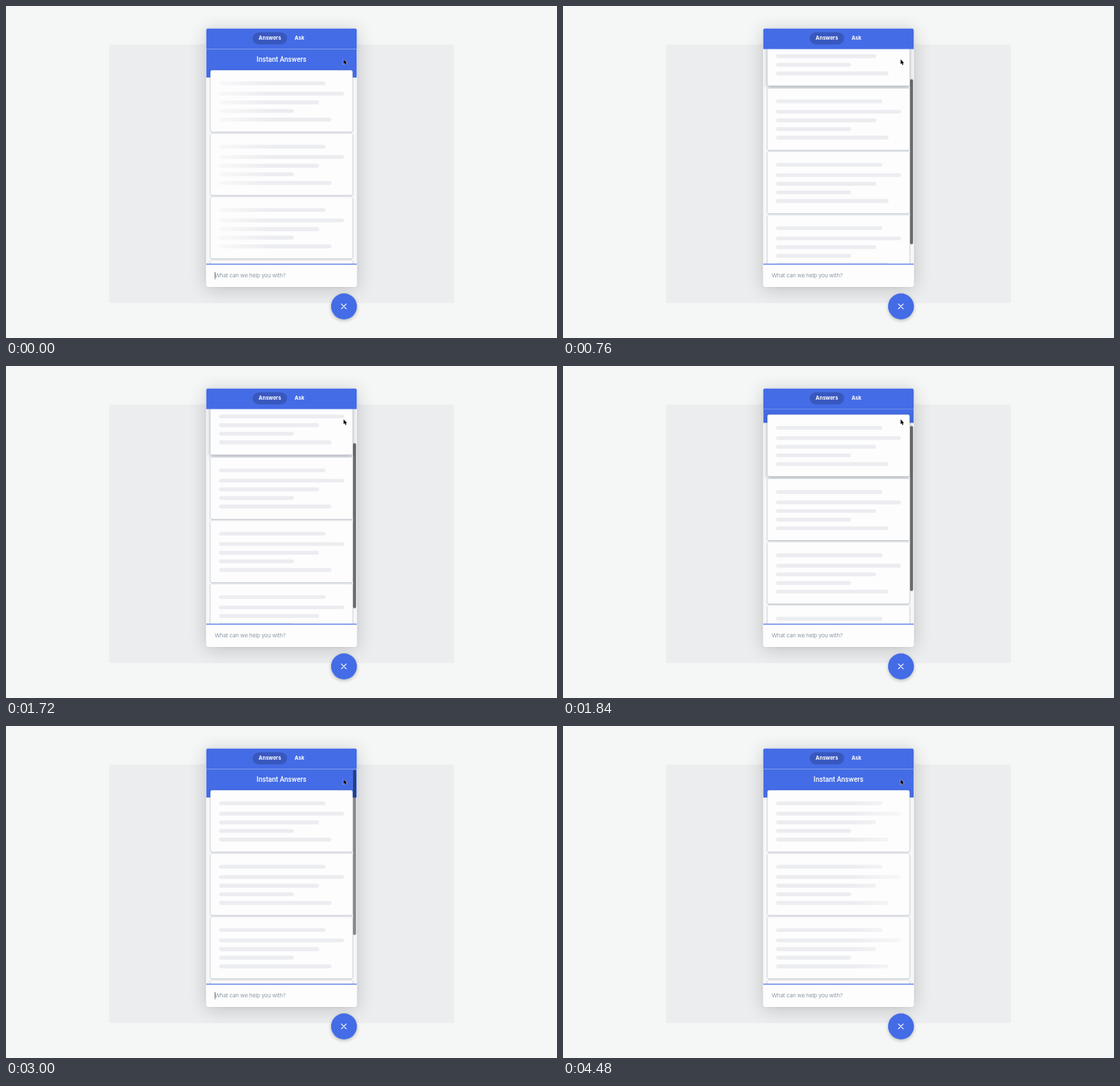
Animation of 800x482 px, one loop 4560 ms. Source, as an HTML page:

```html
<!DOCTYPE html>
<html lang="en">
<head>
<meta charset="utf-8">
<title>Instant Answers</title>
<style>
  html, body { margin: 0; width: 100%; height: 100%; overflow: hidden; }
  body { position: relative; background: #f5f7f7; font-family: Inter, sans-serif; }
  div, svg { position: absolute; box-sizing: border-box; }
  /* The widget is laid out at 350 x 600 and shown smaller. */
  .stage { left: 0; top: 0; transform-origin: 0 0; transform: translate(290.5px, 32.5px) scale(.6258); }
  .page { left: -225px; top: 37px; width: 800px; height: 600px; border-radius: 4px; background: #ebedee; }
  .panel, .shade { width: 350px; height: 600px; border-radius: 6px; }
  .panel { background: #f5f7f9; overflow: hidden; }
  .shade { box-shadow: 0 5px 40px rgba(0, 0, 0, .19), 0 0 3px rgba(0, 0, 0, .15); }
  .blue { background: #446ce6; }
  .view { top: 48px; width: 350px; height: 498px; overflow: hidden; }
  .hero { width: 350px; height: 66px; }
  .heading { top: 8px; width: 350px; text-align: center; color: #fff; font: 500 16px/32px Roboto, sans-serif; }
  .card { left: 10px; width: 330px; height: 143px; border-radius: 4px; background: #fdfdfe; }
  .line { left: 20px; height: 9px; border-radius: 5px; background: #ecedf0; }
  .veil { left: 19px; top: 20px; width: 292px; height: 103px; }
  .tabs { width: 350px; height: 48px; }
  .tab { top: 9px; height: 28px; border-radius: 14px; text-align: center; color: #fff; font-size: 12px; line-height: 28px; font-weight: 700; }
  .thumb { left: 341px; width: 7px; height: 383px; border-radius: 4px; background: rgba(0, 0, 0, .56); }
  .field { top: 546px; width: 350px; height: 54px; border-top: 2px solid #446ce6; background: #fdfdfe; }
  .hint { left: 20px; top: 9px; line-height: 32px; white-space: nowrap; font-size: 13px; letter-spacing: -.3px; color: #8f9aa5; }
  .caret { left: 20px; top: 17px; width: 1px; height: 17px; background: #22282e; }
  .close { left: 290px; top: 615px; width: 60px; height: 60px; border-radius: 50%; box-shadow: 0 3px 8px rgba(0, 0, 0, .26); }
</style>
</head>
<body>
<div class="stage">
  <div class="page"></div>
  <div class="shade"></div>
  <div class="panel">
    <div class="view">
      <div class="hero blue" id="hero"></div>
      <div class="heading" id="heading">Instant Answers</div>
      <div id="list"></div>
    </div>
    <div class="tabs blue">
      <div class="tab" style="left:108px;width:80px;background:#3858be">Answers</div>
      <div class="tab" style="left:188px;width:57px">Ask</div>
    </div>
    <div class="thumb" id="thumb"></div>
    <div class="field">
      <div class="hint">What can we help you with?</div>
      <div class="caret" id="caret"></div>
    </div>
  </div>
  <div class="close blue"></div>
</div>
<svg style="left:0;top:0" width="800" height="482" viewBox="0 0 800 482">
  <path d="M487 432.6l7 7m0-7l-7 7" stroke="#fff" stroke-width="1.3" stroke-linecap="round"/>
  <path d="M490.2 77.6v7l1.6-1.5 1.1 2.6 1.3-.6-1.1-2.4h2.1z" fill="#000" stroke="#fff" stroke-width=".8" paint-order="stroke"/>
</svg>
<script>
const LOOP = 4560, STEP = 40, PITCH = 147;
const $ = id => document.getElementById(id);

// 0 before a, 1 after b, linear between.
const ramp = (t, a, b) => Math.min(1, Math.max(0, (t - a) / (b - a)));
// Quick start and a long settle, like a flick on a trackpad.
const flick = u => 1 - (1 - u ** 1.4) ** 2.3;

// One card down, a rest, then back to the top.
const scroll = t => PITCH * (flick(ramp(t, 480, 1000)) - flick(ramp(t, 1560, 2040)));

// Centre of the pale band that sweeps across the placeholder lines.
function glow(t) {
  if (t < 1000) return 600 * ramp(t, 480, 700);
  return t < 3700 ? .62 * (t - 2040) : 298;
}

function add(parent, name, css) {
  const el = document.createElement('div');
  el.className = name;
  el.style.cssText = css;
  return parent.appendChild(el);
}

const shadow = up => `0 0 2px rgba(30,45,60,.36),
  0 ${1 + 3 * up}px ${2 + 8 * up}px rgba(30,45,60,.32)`;

const cards = [], veils = [];
for (let i = 0; i < 4; i++) {
  const card = add($('list'), 'card', `top:${49 + i * PITCH}px;box-shadow:${shadow(0)}`);
  [85, 100, 80, 60, 90].forEach((percent, row) =>
    add(card, 'line', `top:${row ? 30 + row * 20 : 26}px;width:${percent * 2.9}px`));
  veils.push(add(card, 'veil', ''));
  cards.push(card);
}

function draw(time) {
  const t = Math.floor(time % LOOP / STEP) * STEP;
  const y = scroll(t), c = glow(t);
  const up = ramp(t, 600, 740) - ramp(t, 2040, 2240);
  const show = 1 - ramp(t, 480, 600) + ramp(t, 1940, 2120);

  $('list').style.transform = $('hero').style.transform = `translateY(${-y}px)`;
  cards[0].style.transform = `translateY(${-2 * up}px)`;
  cards[0].style.boxShadow = shadow(up);

  $('heading').style.opacity = show;
  $('heading').style.transform = `translateY(${(1 - show) * 29 - y}px)`;

  const pale = a => `rgba(253,253,254,${a})`;
  const band = `linear-gradient(90deg,${pale(0)} ${c - 120}px,${pale(.7)} ${c}px,${pale(0)} ${c + 120}px)`;
  veils.forEach(v => v.style.background = band);

  // The scroll thumb trails the content by one step.
  $('thumb').style.top = 50 + .75 * scroll(t - STEP) + 'px';
  $('thumb').style.opacity = ramp(t, 480, 520) - ramp(t, 2960, 3160);
  $('caret').style.opacity = (t + 20) % 1000 < 500 ? 1 : 0;
}

const start = performance.now();
function tick() {
  draw(performance.now() - start);
  requestAnimationFrame(tick);
}
tick();
</script>
</body>
</html>
```
